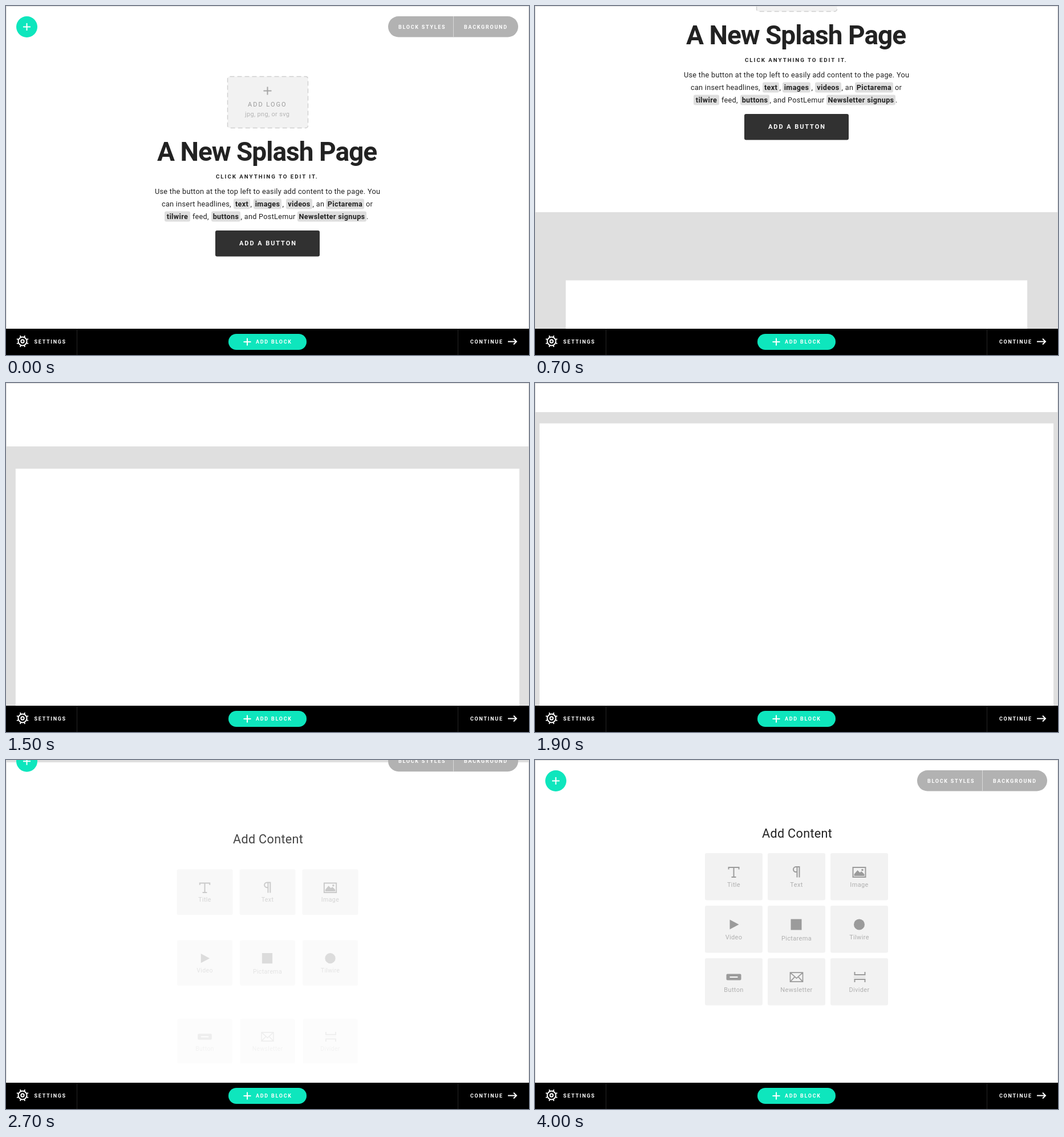
These frames come from a looping animation (917 px wide and 611 px high, 4.1 s). An HTML page:

```html
<!DOCTYPE html>
<html lang="en">
<head>
<meta charset="utf-8">
<title>Page builder</title>
<style>
  html, body { margin: 0; width: 100%; height: 100%; overflow: hidden; background: #fff; }
  svg { display: block; font-family: Roboto, sans-serif; }
  .line { fill: none; stroke-width: 2; }
</style>
</head>
<body>
<svg id="stage" width="917" height="611" viewBox="0 0 917 611"></svg>
<script>
const LOOP = 4100, STEP = 100, FOLD = 565;
const TEAL = '#0ee6bd', INK = '#222', ICON = '#9b9b9b';

const text = (x, y, str, size, spacing, fill = INK, weight = 400, anchor = 'start') =>
  `<text x="${x}" y="${y}" font-size="${size}" letter-spacing="${spacing}" fill="${fill}"
    font-weight="${weight}" text-anchor="${anchor}" xml:space="preserve">${str}</text>`;
const rect = (x, y, w, h, fill, r = 0, extra = '') =>
  `<rect x="${x}" y="${y}" width="${w}" height="${h}" rx="${r}" fill="${fill}" ${extra}/>`;
const line = (d, stroke = '#fff', extra = '') => `<path class="line" d="${d}" stroke="${stroke}" ${extra}/>`;
const plus = (x, y, r, color) => line(`M${x - r} ${y}h${2 * r}M${x} ${y - r}v${2 * r}`, color);
const caps = (x, y, str) => text(x, y, str, 9, 1.73, '#fff', 700);
const body = (x, y, str) => text(x, y, str, 12.7, .29);
const chip = (x, y, w, str) => rect(x, y - 13, w, 18, '#dedede', 3) +
  text(x + w / 2, y, str, 12.7, .32, INK, 700, 'middle');

const toolbar = `
  <circle cx="36.5" cy="36.5" r="18.5" fill="${TEAL}"/>${plus(36.5, 36.5, 6.5, '#fff')}
  ${rect(670, 18, 228, 36.5, '#b2b2b2', 18.2)}
  <path d="M784.5 18v36.5" stroke="#d8d8d8"/>
  ${caps(688, 39.5, 'BLOCK STYLES')}${caps(803, 39.5, 'BACKGROUND')}`;

const splash = `${toolbar}
  ${rect(388.5, 123.5, 141, 90, '#f2f2f2', 4, 'stroke="#cfcfcf" stroke-width="1.4" stroke-dasharray="8 5"')}
  ${plus(458.5, 148.5, 7, '#a5a5a5')}
  ${text(424, 176, 'ADD LOGO', 11, 2, '#999')}
  ${text(419, 193, 'jpg, png, or svg', 11, .33, '#b5b5b5')}
  ${text(265, 270.5, 'A New Splash Page', 46, -1, INK, 700)}
  ${text(368, 302, 'CLICK ANYTHING TO EDIT IT.', 9.8, 1.94, INK, 700)}
  ${body(261, 328.5, 'Use the button at the top left to easily add content to the page. You')}
  ${body(273, 350.5, 'can insert headlines,')}${chip(399, 350.5, 29, 'text')}${body(428.5, 350.5, ',')}
  ${chip(434, 350.5, 49, 'images')}${body(484.5, 350.5, ',')}
  ${chip(491, 350.5, 46, 'videos')}${body(537.5, 350.5, ', an')}
  ${chip(561, 350.5, 67, 'Pictarema')}${body(631, 350.5, 'or')}
  ${chip(278, 372.5, 45, 'tilwire')}${body(327, 372.5, 'feed,')}
  ${chip(360, 372.5, 51, 'buttons')}${body(411.5, 372.5, ', and PostLemur')}
  ${chip(511, 372.5, 121, 'Newsletter signups')}${body(632, 372.5, '.')}
  ${rect(367, 393, 183, 45.5, '#313131', 3)}
  ${text(409, 419, 'ADD A BUTTON', 11, 1.93, '#fff', 700)}`;

// Icons are drawn around their own centre.
const tiles = [
  ['Title', line('M-9-4.5V-8H9v3.5M0-8V9M-4 9H4', ICON)],
  ['Text', line('M6-9H-1a4.5 4.5 0 0 0 0 9H1M1-9V9.5M5-9V9.5', ICON)],
  ['Image', line('M-11-8H11V9H-11Z', ICON) +
    `<path d="M-9 7V4l6-7 4 4 3-2 5 5v3Z" fill="${ICON}"/><circle cx="5.5" cy="-3.5" r="1.8" fill="${ICON}"/>`],
  ['Video', `<path d="M-7-8.5L9 0-7 8.5Z" fill="${ICON}"/>`],
  ['Pictarema', rect(-10, -9.5, 19, 19, ICON), 2],
  ['Tilwire', `<circle r="9.5" fill="${ICON}"/>`],
  ['Button', rect(-13, -5.5, 26, 11, ICON, 2) + line('M-7 0H7')],
  ['Newsletter', line('M-11-8H11V8H-11ZL0 2 11-8M-11 8L-3-.5M11 8L3-.5', ICON, 'style="stroke-width:1.7"')],
  ['Divider', line('M-8-9v5H10v-5M-8 9v-5H10v5', ICON) + line('M-10 0H11', '#d0d0d0', 'style="stroke-width:1"')]
].map(([label, icon, drop = 0]) => `<g class="tile">
  ${rect(-50.5, -41.25, 101, 82.5, '#f2f2f2', 3)}
  <g transform="translate(0 -8.2)">${icon}</g>
  ${text(0, 17.8 + drop, label, 11, .35, '#b0b0b0', 400, 'middle')}</g>`).join('');

const teeth = Array.from({ length: 8 }, (_, i) => {
  const a = (i + .5) * Math.PI / 4, at = r => `${29 + r * Math.cos(a)} ${587 + r * Math.sin(a)}`;
  return `M${at(7.5)}L${at(10.8)}`;
}).join('');

const footer = `${rect(0, FOLD, 917, 46, '#000')}
  <path d="M124.5 565v46M792.5 565v46" stroke="#262626"/>
  <g class="line" stroke="#fff"><circle cx="29" cy="587" r="7.5"/><circle cx="29" cy="587" r="2.7"/><path d="${teeth}"/></g>
  ${caps(49.5, 591, 'SETTINGS')}
  ${rect(390, 574, 137, 28, TEAL, 14)}${plus(423, 588, 6.5, '#fff')}${caps(438, 591, 'ADD BLOCK')}
  ${caps(814, 591, 'CONTINUE')}${line('M880 587.5H895M890 582.5l5 5-5 5')}`;

const stage = document.getElementById('stage');
stage.innerHTML = `<g id="splash">${splash}</g>
  <rect id="backdrop" width="917" height="${FOLD}" fill="#dfdfdf"/>
  <rect id="panel" height="700" fill="#fff"/>
  ${rect(.5, .5, 916, 600, 'none', 0, 'stroke="#dcdcdc"')}
  <g id="toolbar">${toolbar}</g>
  <g id="heading">${text(398, 136, 'Add Content', 21.6, .33)}</g>
  ${tiles}${footer}`;
const part = id => document.getElementById(id);
const tileNodes = [...document.querySelectorAll('.tile')];

const progress = (t, start, length) => Math.min(1, Math.max(0, (t - start) / length));
const remain = u => (1 - u) ** 2;

// cubic-bezier(.25, .1, .25, 1)
function ease(x) {
  let lo = 0, hi = 1, s = .5;
  for (let i = 0; i < 24; i++) {
    s = (lo + hi) / 2;
    if (.75 * s * (1 - s) + s ** 3 < x) lo = s; else hi = s;
  }
  return .3 * s * (1 - s) ** 2 + 3 * s * s * (1 - s) + s ** 3;
}

function place(node, x, y, opacity = 1, scale = 1) {
  node.setAttribute('transform', `translate(${x} ${y}) scale(${scale})`);
  node.setAttribute('opacity', opacity);
}

function draw(t) {
  const scroll = ease(progress(t, 22, 2970));
  const offset = Math.round((FOLD + 2) * scroll);
  const left = FOLD * (1 - scroll), inset = left * .149;
  place(part('splash'), 0, -offset);
  part('backdrop').setAttribute('y', FOLD - offset);
  part('panel').setAttribute('x', inset);
  part('panel').setAttribute('y', left * 1.328);
  part('panel').setAttribute('width', 917 - 2 * inset);

  place(part('toolbar'), 0, -61 * remain(progress(t, 2300, 1600)));
  const title = progress(t, 2000, 1100);
  place(part('heading'), 0, 75 * remain(title), Math.sin(title * Math.PI / 2));
  tileNodes.forEach((node, i) => {
    const row = Math.floor(i / 3), start = 2287 + 96 * row;
    const q = remain(progress(t, start, 1100));
    place(node, 348.5 + 110 * (i % 3), 204.25 + 92 * row + (69 + 47 * row) * q,
      progress(t, start + 140, 520), 1 - .077 * q);
  });
}

function tick() {
  draw(Math.floor(performance.now() % LOOP / STEP) * STEP);
  requestAnimationFrame(tick);
}
tick();
</script>
</body>
</html>
```
